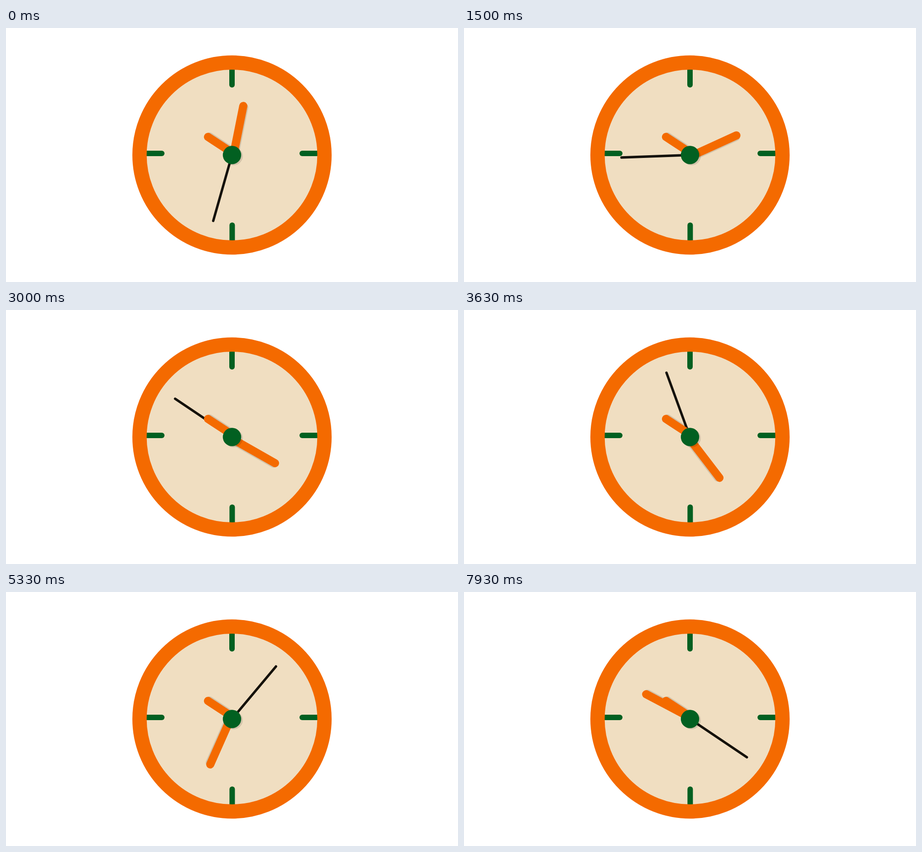
An HTML page that plays this animation: 998 by 561 pixels, repeating every 8 s.

```html
<!DOCTYPE html>
<html lang="en">
<head>
<meta charset="utf-8">
<title>Clock</title>
<style>
  html, body { margin: 0; width: 100%; height: 100%; overflow: hidden; background: #fff; }
  svg { display: block; width: 100%; height: 100%; }
  line { stroke-linecap: round; }
  .ticks { stroke: #026021; stroke-width: 12; }
  .hand { stroke: #f46a00; stroke-width: 18; }
  .shadow { stroke: #000; stroke-width: 18; opacity: .12; }
</style>
</head>
<body>
<svg viewBox="0 0 998 561">
  <g transform="translate(499 280.5)">
    <circle r="200" fill="#f0dec1"/>
    <g class="ticks">
      <line y1="-195" y2="-155"/>
      <line x1=".4" x2=".4" y1="155" y2="195"/>
      <line x1="-195" x2="-155" y1="-3.5" y2="-3.5"/>
      <line x1="155" x2="195" y1="-3.5" y2="-3.5"/>
    </g>
    <circle r="204.2" fill="none" stroke="#f46a00" stroke-width="31.6"/>

    <line id="second" y2="-151.3" stroke="#14110b" stroke-width="5.4"/>
    <g id="minute">
      <line class="shadow" x1="5.7" x2="5.7" y1="2.5" y2="-108.6"/>
      <line class="hand" x1="3.2" x2="3.2" y2="-111.1"/>
    </g>
    <g transform="rotate(303.2)">
      <line class="shadow" x1="6.9" x2="6.9" y1="2.5" y2="-63.7"/>
      <line class="hand" x1="4.4" x2="4.4" y2="-66.2"/>
    </g>

    <circle cx="3.5" cy="2.5" r="20.3" opacity=".12"/>
    <circle r="20.3" fill="#026021"/>
  </g>
</svg>
<script>
const LOOP = 8000;
const second = document.getElementById('second');
const minute = document.getElementById('minute');
const rotate = (hand, degrees) => hand.setAttribute('transform', `rotate(${degrees})`);

// Poses change at 0 and 30 ms of every 100 ms.
function poseTime(ms) {
  const base = Math.floor(ms / 100) / 10;
  return ms % 100 < 30 ? base : base + 1 / 30;
}

function draw(ms) {
  const t = poseTime(ms);
  const whole = Math.floor(t + 1e-6);
  // The second hand sweeps for half of each second, then rests.
  rotate(second, 195.9 + 36 * (whole + Math.min(1, 2 * (t - whole))));
  rotate(minute, 11.3 + 36.12 * t);
}

const start = performance.now();
function tick() {
  draw((performance.now() - start) % LOOP);
  requestAnimationFrame(tick);
}
tick();
</script>
</body>
</html>
```
